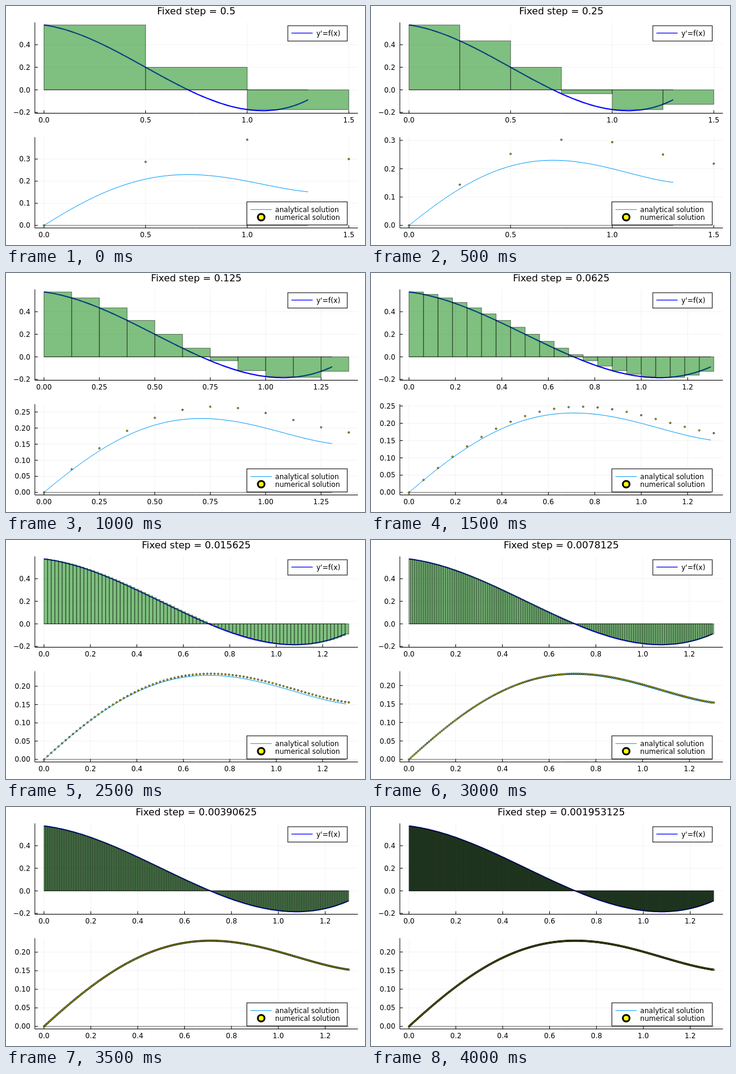
An HTML page with a canvas that plays this animation: 600 by 400 pixels, repeating every 4500 ms.

```html
<!DOCTYPE html>
<html lang="en">
<head>
<meta charset="utf-8">
<title>Fixed step integration</title>
<style>
  html, body { margin: 0; width: 100%; height: 100%; overflow: hidden; background: #fff; }
  canvas { display: block; }
</style>
</head>
<body>
<canvas id="stage" width="600" height="400"></canvas>
<script>
const ctx = document.getElementById('stage').getContext('2d');
const STEP_MS = 500, STEP_COUNT = 9, X_END = 1.3;
const LEFT = 48.2, WIDTH = 540, HEIGHT = 152, MARGIN = 0.03;
const FONT = '"DejaVu Sans", sans-serif';

const slope = x => x ** 3 - 1.5 * x ** 2 - 0.25 * x + 0.575;
const exact = x => x ** 4 / 4 - x ** 3 / 2 - x ** 2 / 8 + 0.575 * x;
const samples = Array.from({ length: 131 }, (_, i) => i * X_END / 130);
const slopeMin = Math.min(...samples.map(slope));

function line(points, color, width) {
  ctx.beginPath();
  for (const [x, y] of points) ctx.lineTo(x, y);
  ctx.strokeStyle = color;
  ctx.lineWidth = width;
  ctx.stroke();
}

function text(string, x, y, align = 'left', size = 11.7) {
  ctx.font = `${size}px ${FONT}`;
  ctx.textAlign = align;
  ctx.fillStyle = '#000';
  ctx.fillText(string, x, y);
}

function marker(x, y, radius, border) {
  ctx.beginPath();
  ctx.arc(x, y, radius, 0, 2 * Math.PI);
  ctx.fillStyle = '#ff0';
  ctx.fill();
  ctx.strokeStyle = '#000';
  ctx.lineWidth = border;
  ctx.stroke();
}

function legendBox(x, y, w, h) {
  ctx.fillStyle = '#fff';
  ctx.fillRect(x, y, w, h);
  ctx.strokeStyle = '#000';
  ctx.lineWidth = 1;
  ctx.strokeRect(x, y, w, h);
}

// Maps data to pixels, with limits widened by MARGIN on each side.
function makePlot(top, xMax, yMin, yMax) {
  const scaleX = WIDTH / (xMax * (1 + 2 * MARGIN));
  const range = yMax - yMin;
  const scaleY = HEIGHT / (range * (1 + 2 * MARGIN));
  return {
    top, bottom: top + HEIGHT,
    px: x => LEFT + (x + xMax * MARGIN) * scaleX,
    py: y => top + (yMax + range * MARGIN - y) * scaleY,
  };
}

function ticks(from, to, step) {
  const digits = String(step).split('.')[1].length;
  const list = [];
  for (let i = Math.ceil(from / step - 1e-9); i * step <= to + 1e-9; i++) {
    list.push([i * step, (i * step).toFixed(digits).replace('-', '\u2212')]);
  }
  return list;
}

function drawAxes({ top, bottom, px, py }, xTicks, yTicks) {
  const right = LEFT + WIDTH;
  const grid = 'rgba(0,0,0,0.1)';
  for (const [value, label] of xTicks) {
    const x = px(value);
    line([[x, top], [x, bottom]], grid, 0.5);
    line([[x, bottom], [x, bottom - 5]], '#000', 1);
    text(label, x, bottom + 15.6, 'center');
  }
  for (const [value, label] of yTicks) {
    const y = py(value);
    line([[LEFT, y], [right, y]], grid, 0.5);
    line([[LEFT, y], [LEFT + 5, y]], '#000', 1);
    text(label, 40.6, y + 4.2, 'right');
  }
  line([[LEFT, top], [LEFT, bottom], [right, bottom]], '#000', 1);
}

function drawCurve({ px, py }, fn, color, width) {
  line(samples.map(x => [px(x), py(fn(x))]), color, width);
}

function drawZero({ px, py }) {
  line([[px(0), py(0)], [px(X_END), py(0)]], '#000', 0.6);
}

function drawBars({ px, py }, h, count) {
  ctx.strokeStyle = 'rgba(0,0,0,0.5)';
  ctx.fillStyle = 'rgba(0,128,0,0.5)';
  ctx.lineWidth = 1;
  const base = py(0), width = px(h) - px(0);
  for (let i = 0; i < count; i++) {
    const y = py(slope(i * h));
    const box = [px(i * h), Math.min(y, base), width, Math.abs(base - y)];
    ctx.fillRect(...box);
    ctx.strokeRect(...box);
  }
}

function draw(index) {
  const h = 0.5 / 2 ** index;
  const count = Math.ceil(X_END / h);
  const xMax = count * h;
  const sums = [0];
  for (let i = 0; i < count; i++) sums.push(sums[i] + h * slope(i * h));
  const yMax = Math.max(...sums);
  const xTicks = ticks(0, xMax, xMax >= 1.5 ? 0.5 : xMax > 1.35 ? 0.25 : 0.2);

  ctx.fillStyle = '#fff';
  ctx.fillRect(0, 0, 600, 400);
  text(`Fixed step = ${h}`, 318, 14, 'center', 16.1);

  const upper = makePlot(27.5, xMax, slopeMin, slope(0));
  drawAxes(upper, xTicks, ticks(-0.2, 0.4, 0.2));
  drawCurve(upper, slope, '#00f', 2);
  drawBars(upper, h, count);
  drawZero(upper);
  legendBox(471, 33, 99.3, 25.7);
  line([[477, 45.3], [512.5, 45.3]], '#00f', 1.2);
  text("y'=f(x)", 518.7, 49.6);

  const lower = makePlot(219.5, xMax, 0, yMax);
  drawAxes(lower, xTicks, ticks(0, yMax * (1 + MARGIN), yMax > 0.3 ? 0.1 : 0.05));
  drawCurve(lower, exact, '#009afa', 1);
  sums.forEach((y, i) => marker(lower.px(i * h), lower.py(y), 1.3, 0.9));
  drawZero(lower);
  legendBox(402.6, 327.8, 167.7, 38.6);
  line([[408.5, 340.7], [444, 340.7]], '#009afa', 1);
  text('analytical solution', 449.8, 345);
  marker(426.5, 353.5, 5.6, 3);
  text('numerical solution', 449.8, 358);
}

let shown = -1;
const start = performance.now();
function tick() {
  const index = Math.floor((performance.now() - start) / STEP_MS) % STEP_COUNT;
  if (index !== shown) draw(shown = index);
  requestAnimationFrame(tick);
}
tick();
</script>
</body>
</html>
```
